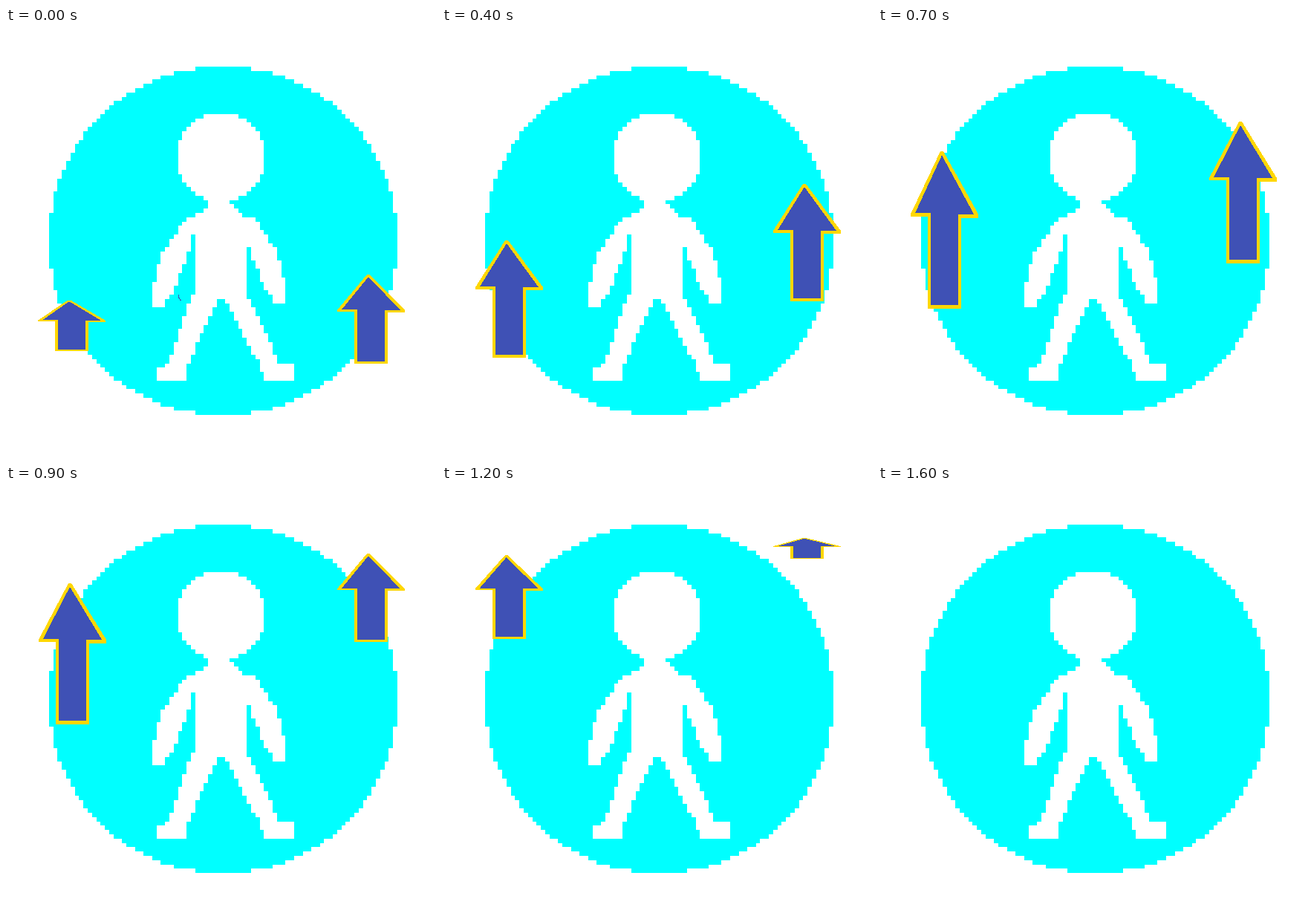
These frames come from a looping animation (579x579 px, 1700 ms). An HTML page:

```html
<!DOCTYPE html>
<html lang="en">
<head>
<meta charset="utf-8">
<title>Walker and arrows</title>
<style>
html, body { margin: 0; width: 100%; height: 100%; overflow: hidden; background: #fff; }
svg { display: block; width: 100vw; height: 100vh; }
</style>
</head>
<body>
<svg viewBox="0 0 579 579" shape-rendering="crispEdges">
  <defs>
    <g id="arrow">
      <path fill="#ffd700" d="M40 0H44L91 63V67H68V158H23V65.5H0V63Z"/>
      <path fill="#3f51b5" d="M42 4L85 63H64V154H27V62H6Z"/>
    </g>
  </defs>
  <g transform="scale(5.79)">
    <path id="disc" fill="#0ff"/>
    <path id="walker" fill="#fff"/>
  </g>
  <path id="mark" d="M232.5 359V363L235.5 367" fill="none" stroke="#3f51b5"/>
  <use id="left" href="#arrow"/>
  <use id="right" href="#arrow"/>
</svg>
<script>
const el = id => document.getElementById(id);

// Values at t, interpolated between keys [t, ...values] and clamped at both ends.
function at(keys, t) {
  const i = keys.findIndex(k => k[0] >= t);
  if (i < 1) return keys.at(i).slice(1);
  const a = keys[i - 1], b = keys[i];
  const f = (t - a[0]) / (b[0] - a[0]);
  return a.map((v, n) => v + (b[n] - v) * f).slice(1);
}

// Cell rows first..last, filled between two edges that depend on the row.
function rows(first, last, from, to) {
  let d = '';
  for (let y = first; y <= last; y++) {
    const a = Math.round(from(y)), b = Math.round(to(y));
    d += `M${a} ${y}H${b}v1H${a}z`;
  }
  return d;
}

const edge = (...keys) => y => at(keys, y)[0];

// A disc, very slightly squared.
const discHalf = y => Math.floor((1768 - Math.abs(y - 49) ** 2.02) ** (1 / 2.02));
const headHalf = y => Math.sqrt(106 - (y - 29.5) ** 2);

const armL = edge([41, 47.2], [44, 42.3], [46, 40.4], [52, 36.2], [59, 34.4], [64, 34]);
const armR = edge([40, 52], [43, 55.4], [44, 58], [51, 62.7], [58, 64.6], [63, 65]);
const innerArmL = edge([48, 43.4], [54, 41.8], [61, 38.6], [64, 36.7]);
const innerArmR = edge([48, 56], [50, 56.2], [61, 60.7], [63, 62.4]);
const waistL = edge([0, 44]);
const waistR = edge([0, 56]);
const legL = edge([62, 43], [77, 38], [79, 35]);
const legR = edge([62, 56.2], [73, 61.8], [77, 63], [78, 67]);
const innerLegL = edge([63, 49.3], [72, 44.8], [78, 42.4], [81, 42]);
const innerLegR = edge([63, 51], [77, 58.5], [81, 60]);

el('disc').setAttribute('d', rows(9, 89, y => 50 - discHalf(y), y => 51 + discHalf(y)));
el('walker').setAttribute('d', [
  rows(20, 39, y => 50 - headHalf(y), y => 50 + headHalf(y)),
  rows(40, 47, armL, armR),
  rows(48, 64, armL, innerArmL),
  rows(48, 61, waistL, waistR),
  rows(48, 63, innerArmR, armR),
  rows(62, 62, legL, legR),
  rows(63, 81, legL, innerLegL),
  rows(63, 81, innerLegR, legR)
].join(''));

// Keys: step, x, top, bottom
const arrows = {
  left: [
    [0, 43, 366.5, 435], [2, 44, 349, 473], [4, 45, 286, 444], [6, 44, 166, 378],
    [8, 44, 131, 321], [10, 44, 107, 245], [13, 46, 66, 128], [14, 46, 37, 80]
  ],
  right: [
    [0, 446, 332, 452], [4, 446, 210, 368], [6, 446, 126, 317],
    [8, 446, 91, 210], [11, 446, 70, 98]
  ]
};

function place(id, step) {
  const keys = arrows[id];
  const [x, top, bottom] = at(keys, step);
  el(id).setAttribute('visibility', step > keys.at(-1)[0] ? 'hidden' : 'visible');
  el(id).setAttribute('transform', `translate(${x} ${top}) scale(1 ${(bottom - top) / 158})`);
}

function draw(ms) {
  const tick = Math.floor((ms % 1700) / 100);
  const step = tick > 4 ? tick - 1 : tick; // step 4 is held for two ticks
  place('left', step);
  place('right', step);
  el('mark').setAttribute('visibility', step === 0 ? 'visible' : 'hidden');
}

let start;
function loop(now) {
  start ??= now;
  draw(now - start);
  requestAnimationFrame(loop);
}
draw(0);
requestAnimationFrame(loop);
</script>
</body>
</html>
```
